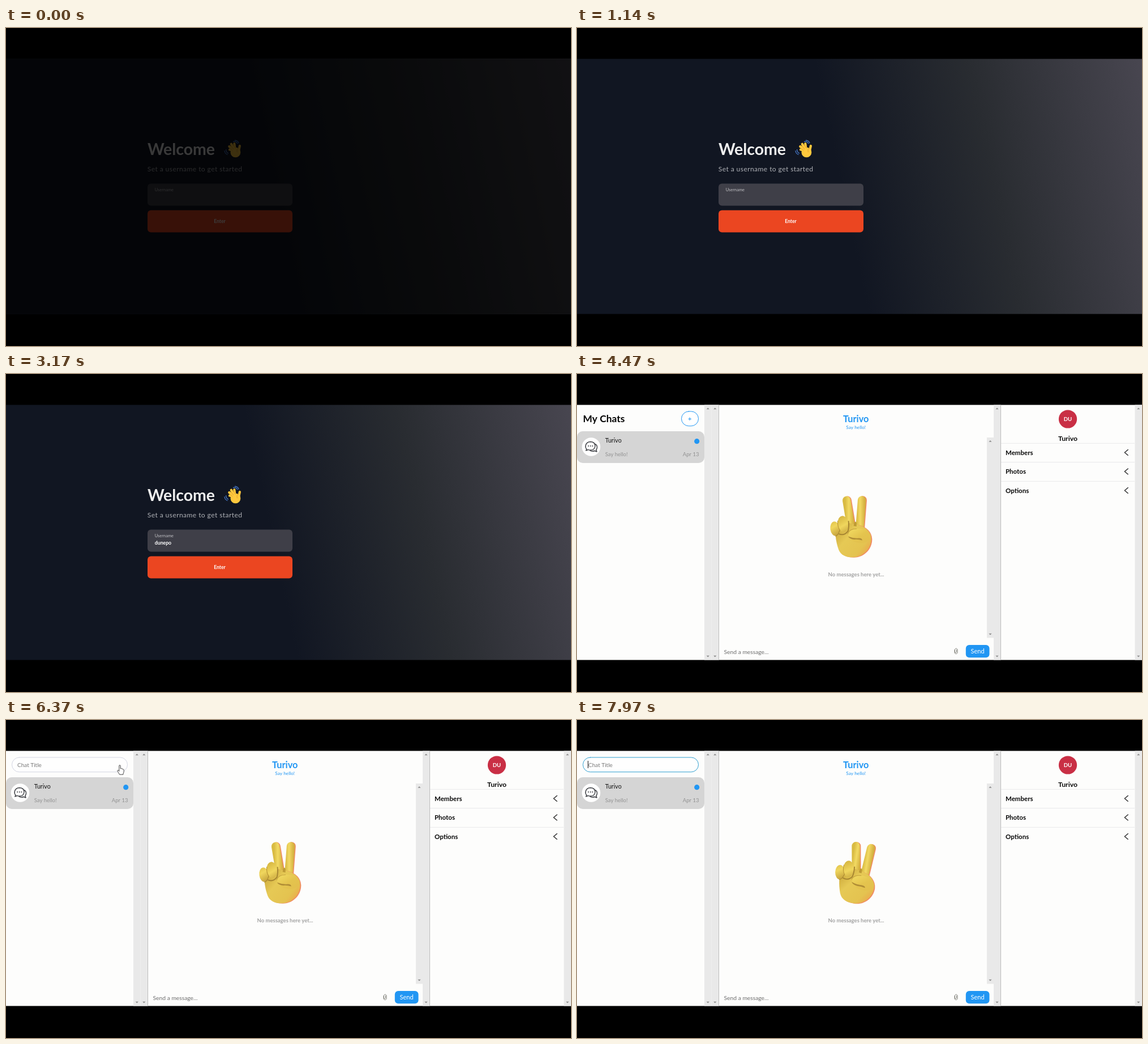
Animation, 998 px wide and 561 px high, one loop 8 s. Source, as an HTML page with a canvas:

```html
<!DOCTYPE html>
<html lang="en">
<head>
<meta charset="utf-8">
<title>Chat sign-in</title>
<style>
html, body { margin: 0; width: 100%; height: 100%; overflow: hidden; background: #000; }
canvas { display: block; width: 100%; height: 100%; }
</style>
</head>
<body>
<canvas id="stage" width="998" height="561"></canvas>
<script>
const ctx = document.getElementById('stage').getContext('2d');
const LOOP = 8000, TOP = 54.5, BOTTOM = 504.5;
const BLUE = '#2196f3', PAPER = '#fdfdfc', USER = 'dunepo', CHAT = 'Turivo';
const TIMES = { fadeEnd: 800, type: 2300, key: 100, chat: 3280, loaded: 3650, title: 5600, focus: 7600 };

function text(str, x, y, size, color, { weight = 400, align = 'left', gap = 0 } = {}) {
  ctx.font = `${weight} ${size}px Lato, Carlito, sans-serif`;
  ctx.letterSpacing = gap + 'px';
  ctx.textAlign = align;
  ctx.fillStyle = color;
  ctx.fillText(str, x, y);
}

function box(x, y, w, h, r, fill, stroke) {
  ctx.beginPath();
  ctx.roundRect(x, y, w, h, r);
  if (fill) { ctx.fillStyle = fill; ctx.fill(); }
  if (stroke) { ctx.strokeStyle = stroke; ctx.lineWidth = 1; ctx.stroke(); }
}

function rect(x, y, w, h, fill) {
  ctx.fillStyle = fill;
  ctx.fillRect(x, y, w, h);
}

function ellipse(x, y, rx, ry, angle, fill) {
  ctx.beginPath();
  ctx.ellipse(x, y, rx, ry, angle, 0, Math.PI * 2);
  ctx.fillStyle = fill;
  ctx.fill();
}

function line(points, color, width) {
  ctx.beginPath();
  points.forEach(([x, y], i) => i ? ctx.lineTo(x, y) : ctx.moveTo(x, y));
  ctx.strokeStyle = color;
  ctx.lineWidth = width;
  ctx.lineCap = ctx.lineJoin = 'round';
  ctx.stroke();
}

function path(d, fill, stroke, width = 1) {
  const p = new Path2D(d);
  if (fill) { ctx.fillStyle = fill; ctx.fill(p); }
  if (stroke) {
    ctx.strokeStyle = stroke;
    ctx.lineWidth = width;
    ctx.lineCap = ctx.lineJoin = 'round';
    ctx.stroke(p);
  }
}

function gradient(x0, y0, x1, y1, ...stops) {
  const g = ctx.createLinearGradient(x0, y0, x1, y1);
  stops.forEach(([at, color]) => g.addColorStop(at, color));
  return g;
}

function wavingHand() {
  const skin = '#ffc83d', shade = '#d99a2b';
  path('M401.5 200.3Q406 199.2 408.8 203.6 M404.5 198.2Q409.3 198.6 411 203', null, '#4a7fd6', 1.2);
  path('M388.6 214.5Q388.6 219 392.4 221 M386 216.5Q386.5 221.5 391 223.3', null, '#4a7fd6', 1.2);
  line([[410.5, 219], [412.9, 208]], skin, 4.2);
  for (const [x, y] of [[395, 214.6], [394.3, 209], [397.8, 204.8], [403.3, 204]]) {
    line([[405, 217.5], [x, y]], skin, 4.2);
  }
  ellipse(405.4, 219.4, 8.9, 8.9, 0, skin);
  path('M397 207.8L401.8 213.6 M401.2 205.5L405.2 212 M396.4 212.4L400 216 M410.3 211.5Q406.5 214.5 408.2 219', null, shade, 0.8);
}

function login(t) {
  const bg = gradient(-24, 391, 1022, 168,
    [0, '#111622'], [0.47, '#111622'], [0.72, '#292c31'], [1, '#484650']);
  rect(0, TOP, 998, BOTTOM - TOP, bg);
  text('Welcome', 250, 224, 28.4, '#efefef', { weight: 700 });
  wavingHand();
  text('Set a username to get started', 249.8, 253, 12.05, '#b0b2b7', { gap: 0.42 });
  box(250, 274.5, 256, 39, 6, '#3f3f48');
  text('Username', 262.8, 287.5, 7.3, '#c4c4c8', { gap: 0.1 });
  const typed = Math.max(0, Math.floor((t - TIMES.type) / TIMES.key) + 1);
  text(USER.slice(0, typed), 262.8, 301.3, 8.7, '#fff', { weight: 700 });
  box(250, 321.5, 256, 39, 6, '#eb4621');
  text('Enter', 377.5, 344.4, 8.6, '#fff', { weight: 700, align: 'center' });
  const dark = Math.max(0, 0.76 * (1 - t / TIMES.fadeEnd));
  rect(0, TOP, 998, BOTTOM - TOP, `rgba(0,0,0,${dark})`);
}

function arrows(x, y0, y1) {
  for (const [y, d] of [[y0, -1], [y1, 1]]) {
    path(`M${x - 2.6} ${y - d * 1.3}h5.2l-2.6 ${d * 2.8}z`, '#8c8c8c');
  }
}

function scrollbar(x, w, y0 = TOP, y1 = BOTTOM) {
  rect(x, y0, w, y1 - y0, '#e9e9e9');
  arrows(x + w / 2, y0 + 6.5, y1 - 6.5);
}

function bubbles() {
  ellipse(25, 128.5, 16.3, 16.3, 0, '#fff');
  path('M30 123Q36 124 35.5 130Q35 132.5 33.8 133.5L35 137L31 135.5Q26 137.5 22.5 134.5', null, '#3b3d42', 1.4);
  path('M17 132.5Q14.5 130 15.3 126Q17 119.5 24 119.5Q32 120 32 127Q31.5 134 24 134.3Q21.5 134.3 20 133.5L15.8 135Z', '#fff', '#3b3d42', 1.4);
  for (const x of [20.2, 23.8, 27.4]) ellipse(x, 127, 1, 1, 0, '#3b3d42');
}

function sidebar(t) {
  if (t < TIMES.title) {
    text('My Chats', 10.5, 84.7, 17.4, '#050505', { weight: 700 });
    box(184.5, 66, 30, 25.7, 12.8, '#fff', BLUE);
    line([[196.8, 79.3], [201.6, 79.3]], BLUE, 1);
    line([[199.2, 76.9], [199.2, 81.7]], BLUE, 1);
  } else {
    const focused = t >= TIMES.focus;
    box(10.5, 66, 204, 25.7, 12.8, '#fefefe', focused ? '#2f9fd0' : '#d3d5e2');
    text('Chat Title', 20, 82.5, 10, '#777');
    if (focused && (t - TIMES.focus) % 1060 < 530) rect(19, 72, 1, 13, '#111');
  }
  if (t < TIMES.loaded) return;
  box(0, 101, 225, 56, 10, '#d5d5d5');
  bubbles();
  text(CHAT, 49.7, 121.3, 10.7, '#111');
  ellipse(211.7, 118.7, 4.6, 4.6, 0, BLUE);
  text('Say hello!', 49.7, 145, 9.5, '#929292');
  text('Apr 13', 215.5, 145, 9.5, '#929292', { align: 'right' });
}

// Capsule with a warm rim on its right side.
function finger(x0, y0, x1, y1, w) {
  line([[x0 + 1.5, y0], [x1 + 1.5, y1]], '#f08a63', w);
  const mid = (x0 + x1) / 2;
  line([[x0, y0], [x1, y1]], gradient(mid - w / 2, 0, mid + w / 2, 0,
    [0, '#d9bb43'], [0.45, '#f2da63'], [1, '#d5b140']), w);
}

function peaceHand(t) {
  const angle = 3.7 - 7.5 * Math.cos((t - 4572) / 633 * Math.PI * 2);
  ctx.save();
  ctx.translate(488, 325);
  ctx.rotate(angle * Math.PI / 180);
  ctx.translate(-488, -325);
  finger(499, 280, 503.8, 222.5, 14.5);
  finger(486, 280, 476.8, 222.8, 14.5);
  const palm = 'M457 274C456 288 459 300 462 309C466 320 476 323.5 488 323.3C506 323 520 308 519.8 291C519 278 510 270 497 266L474 262Z';
  ctx.save();
  ctx.translate(1.7, 0.4);
  path(palm, '#f08a63');
  ctx.restore();
  path(palm, gradient(458, 270, 518, 318, [0, '#c9a63a'], [0.35, '#e6c955'], [0.75, '#e4c350'], [1, '#eda24b']));
  path('M490 263Q492 258 494 263L494 269L489 268Z', '#bd9a35');
  path('M463 282Q472 286 479 277Q481 270 480 260', null, '#a78632', 2);
  const curl = x => gradient(x - 9, 255, x + 9, 285, [0, '#d8b842'], [0.45, '#f0d65d'], [1, '#bd9836']);
  ellipse(456, 272.8, 8.3, 12.8, -0.12, curl(456));
  path('M464 276Q462 284 457 286', null, '#a78632', 1);
  ellipse(470, 264.5, 9.3, 14.3, -0.1, curl(470));
  path('M461 259Q460 269 465 276', null, '#b69234', 1);
  ellipse(499.5, 285.5, 20, 12.5, 0.12, gradient(490, 272, 507, 298,
    [0, '#efd65e'], [0.55, '#e4c44e'], [1, '#e3c04d']));
  path('M479 286.5Q489 290.5 498 289.5Q504 289.5 504 293.5Q497 291.5 490 292Q482 291.5 479 286.5Z', '#b08d36');
  path('M478 282Q481 273 494 273', null, '#c4a23d', 1);
  ctx.restore();
}

function clip() {
  path('M667 487V492Q669.5 495.5 672 492V486Q669.5 482 667.5 486V491Q669.5 493 670.5 490V486.5', null, '#77766f', 0.9);
}

function conversation(t) {
  scrollbar(724, 12, 112, 465.5);
  text('Send a message...', 259.5, 493.8, 10.3, '#6e6e6e');
  clip();
  box(686.8, 478, 41.7, 22.3, 6, BLUE);
  text('Send', 707.6, 493.2, 11, '#fff', { align: 'center' });
  if (t < TIMES.loaded) return;
  text(CHAT, 492.7, 84.5, 16.3, BLUE, { weight: 700, align: 'center' });
  text('Say hello!', 492.7, 97, 8.3, BLUE, { align: 'center' });
  peaceHand(t);
  text('No messages here yet...', 493, 356.7, 9.5, '#a2a2a2', { weight: 700, align: 'center' });
}

function details(t) {
  if (t >= TIMES.loaded) {
    ellipse(867, 79.5, 16.1, 16.1, 0, '#c92f45');
    text(USER.slice(0, 2).toUpperCase(), 867, 83, 9.6, '#fff', { weight: 700, align: 'center' });
    text(CHAT, 867, 118.3, 12.2, '#080808', { weight: 700, align: 'center' });
  }
  ['Members', 'Photos', 'Options'].forEach((label, i) => {
    const y = 138.4 + i * 33.5;
    rect(749, y - 16.6, 236, 0.8, '#e3e3e6');
    text(label, 757, y + 4.3, 11.5, '#080808', { weight: 700 });
    line([[973.3, y - 5], [967.3, y], [973.3, y + 5]], '#222', 1.3);
  });
}

// Pointer stops: time, x, y of the hot spot.
const STOPS = [
  [4850, 985, 458], [5040, 812, 334], [5260, 191.5, 80], [5650, 191.5, 80],
  [5760, 200, 80], [6760, 200, 80], [7200, 100, 80], [7650, 100, 80]
];

function pointer(t) {
  const i = STOPS.findIndex(s => t < s[0]);
  if (i < 1) return;
  const [t0, x0, y0] = STOPS[i - 1], [t1, x1, y1] = STOPS[i];
  const p = (t - t0) / (t1 - t0), e = p * p * (3 - 2 * p);
  ctx.save();
  ctx.translate(x0 + (x1 - x0) * e, y0 + (y1 - y0) * e);
  if (t < 5230) {
    path('M0 0V13L3 10.3L5 15L7 14.2L5 9.6H9Z', '#fff', '#222', 0.8);
  } else if (t < 6800) {
    path('M-0.2 9V1Q0 -0.8 1.2 -0.4Q2.2 -0.1 2.2 1V5.5Q4.2 4.6 4.5 6.2Q6.2 5.5 6.5 7Q8.2 6.8 8.2 8.3V11Q8 13 7 14.5V16.2H0.5Q-0.5 14 -3 10.4Q-3.6 8.8 -2.3 8.6Q-1 8.5 -0.2 10Z', '#fff', '#333', 0.9);
  } else {
    path('M-2 -6Q0 -6 0 -5Q0 -6 2 -6M0 -5V5M-2 6Q0 6 0 5Q0 6 2 6', null, '#333', 0.9);
  }
  ctx.restore();
}

function chat(t) {
  rect(0, TOP, 998, BOTTOM - TOP, PAPER);
  scrollbar(225, 12.5);
  scrollbar(237.5, 12.5);
  scrollbar(736, 12);
  scrollbar(985.5, 12.5);
  rect(250, TOP, 1, BOTTOM - TOP, '#bdbdbd');
  rect(748, TOP, 1, BOTTOM - TOP, '#bdbdbd');
  sidebar(t);
  conversation(t);
  details(t);
  pointer(t);
}

const start = performance.now();
function draw() {
  const t = (performance.now() - start) % LOOP;
  rect(0, 0, 998, 561, '#000');
  (t < TIMES.chat ? login : chat)(t);
  requestAnimationFrame(draw);
}
draw();
</script>
</body>
</html>
```
